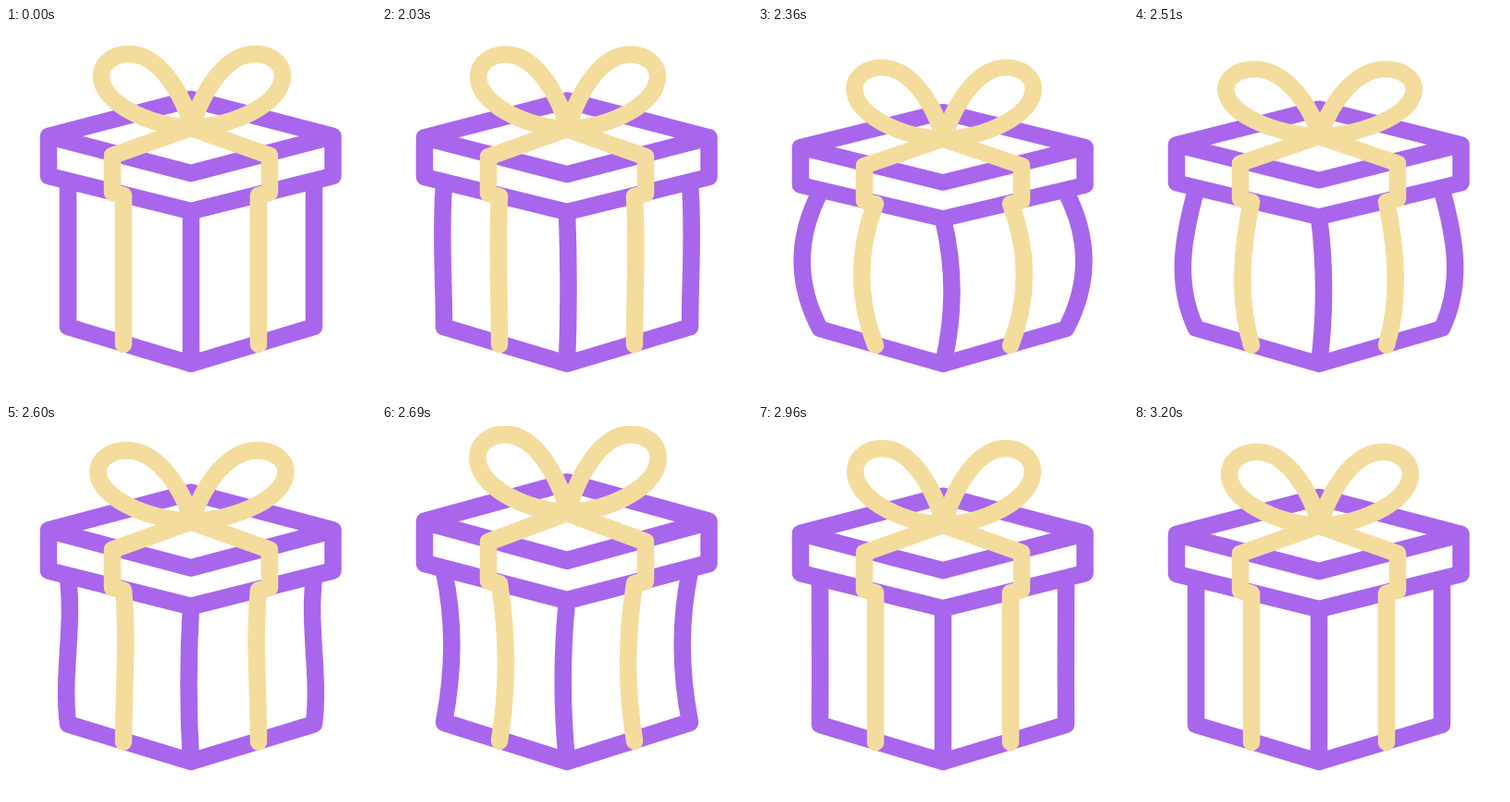
An HTML page with a canvas that plays this animation: 400x400 px, repeating every 3.23 s.

```html
<!DOCTYPE html>
<html>
<head>
<meta charset="utf-8">
<title>Gift box</title>
<style>
html, body { margin: 0; height: 100%; overflow: hidden; background: #fff; }
canvas { display: block; width: 100vw; height: 100vh; }
</style>
</head>
<body>
<canvas id="stage" width="400" height="400"></canvas>
<script>
const ctx = document.getElementById('stage').getContext('2d');
const LOOP = 3230, START = 2000, STEP = 30, LAST = 40;
const PURPLE = '#a866ec', CREAM = '#f4dc9c', GROUND = 372;

// Eases through [step, value] turning points: quick start, then smooth swings
function track(...points) {
  return step => {
    const i = points.findIndex(p => p[0] > step);
    if (i < 0) return points.at(-1)[1];
    if (i === 0) return points[0][1];
    const [t0, v0] = points[i - 1], [t1, v1] = points[i];
    const u = (step - t0) / (t1 - t0);
    const eased = i === 1 ? Math.sin(u * Math.PI / 2) : (1 - Math.cos(u * Math.PI)) / 2;
    return v0 + (v1 - v0) * eased;
  };
}

const height = track([0, 1], [15, .951], [23.5, 1.055], [27, 1.006], [LAST, 1]);
const bulge = track([0, 0], [10, 26], [14, 25], [22, -12], [31, 0]);
const droop = track([0, 0], [7, -1], [18.5, .85], [26.5, -.65], [LAST, 0]);

function stroke(color, d) {
  ctx.strokeStyle = color;
  ctx.stroke(new Path2D(d));
}

// Upright that bends outward; its lower half trails further from the centre
function upright(step, side, dx, top, bottom) {
  const x = 200 + side * dx, third = (bottom - top) / 3;
  const reach = side * (.5 + dx / 266);
  const upper = x + reach * bulge(step), lower = x + reach * bulge(step - dx * .015);
  return `M${x} ${top}C${upper} ${top + third} ${lower} ${bottom - third} ${x} ${bottom}`;
}

function bowLoop(step, side) {
  const bend = droop(step);
  const p = (dx, y) =>
    `${201 + side * dx * (1 + .05 * bend)} ${105 + (y - 105) * (1 - .075 * bend)} `;
  return 'M' + p(0, 108) + 'C' + p(50, 105) + p(98, 80) + p(98, 52)
    + 'C' + p(98, 38) + p(85, 28) + p(68, 28)
    + 'C' + p(40, 28) + p(15, 60) + p(0, 105);
}

function draw(step) {
  const scale = height(step);
  ctx.setTransform(1, 0, 0, 1, 0, 0);
  ctx.fillStyle = '#fff';
  ctx.fillRect(0, 0, 400, 400);
  ctx.setTransform(1, 0, 0, scale, 0, GROUND * (1 - scale));
  ctx.lineWidth = 18.5;
  ctx.lineCap = ctx.lineJoin = 'round';

  stroke(PURPLE, upright(step, -1, 133, 168, 323) + 'L200 363L333 323'
    + upright(step, 1, 133, 168, 323) + upright(step, 1, 0, 198, 363));
  stroke(PURPLE, 'M46 117L200 77L353.5 117L200 157ZV160L200 198L353.5 160V117');

  for (const side of [-1, 1]) {
    stroke(CREAM, `M200 108L${200 + side * 85} 138V178L${200 + side * 73} 181`
      + upright(step, side, 73, 181, 342));
    stroke(CREAM, bowLoop(step, side));
  }
}

function frame(now) {
  const step = Math.floor((now % LOOP - START) / STEP);
  draw(Math.min(LAST, Math.max(0, step)));
  requestAnimationFrame(frame);
}
frame(performance.now());
</script>
</body>
</html>
```
